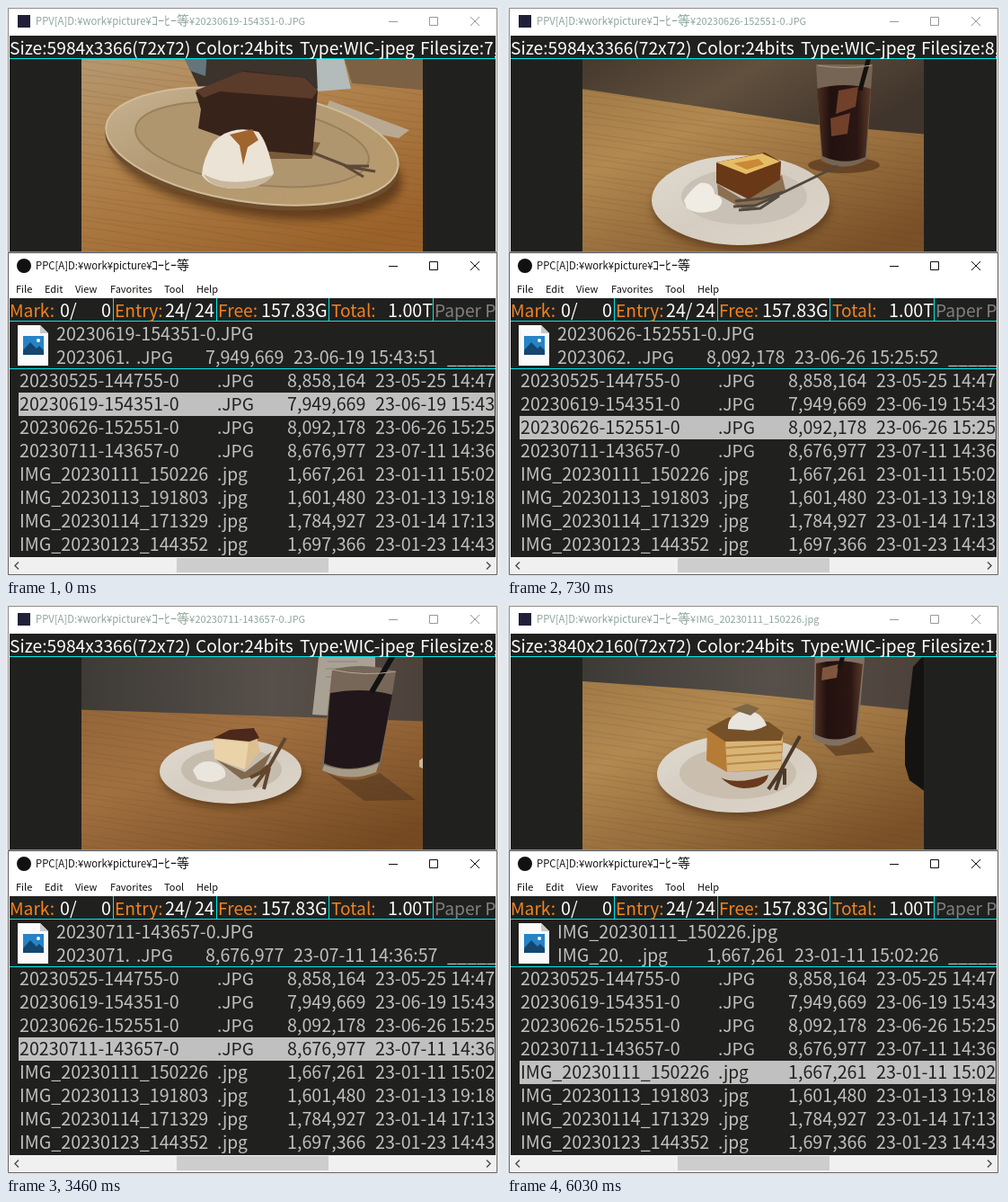
Recreate the animation shown at these times as an HTML page. Size 551 px wide and 634 px high, loop 8000 ms.

```html
<!DOCTYPE html>
<html lang="ja">
<head>
<meta charset="utf-8">
<title>Image viewer and file list</title>
<style>
html, body { margin: 0; width: 100%; height: 100%; overflow: hidden; background: #e9e9e9; }
svg { display: block; }
text { font: 19.7px "Noto Sans CJK JP", "Noto Sans", sans-serif; fill: #c0c0c0; white-space: pre; }
.small text { font-size: 11px; fill: #111; }
.small .path { font-size: 11.3px; }
.small .kana { font-size: 14px; }
.idle text { fill: #8fa69a; }
.white, .white text { fill: #fff; }
.label { fill: #f4821f; }
.word, .word text { font-size: 19.2px; }
.dim { fill: #808080; }
</style>
</head>
<body>
<svg width="551" height="634" viewBox="0 0 551 634">
  <defs>
    <clipPath id="view"><path d="M4 33H545V612H4Z"/></clipPath>
    <clipPath id="photoArea"><path d="M84 59H464V273H84Z"/></clipPath>
    <linearGradient id="wallA" x2="1" y2=".4"><stop stop-color="#41362b"/><stop offset=".5" stop-color="#61503e"/><stop offset="1" stop-color="#40352c"/></linearGradient>
    <linearGradient id="wallB" x2="1" y2="0"><stop stop-color="#3c3935"/><stop offset=".55" stop-color="#57504a"/><stop offset="1" stop-color="#4b4038"/></linearGradient>
    <linearGradient id="daylit" x2=".6" y2="1"><stop stop-color="#b59a74"/><stop offset=".45" stop-color="#b0824c"/><stop offset="1" stop-color="#9a6129"/></linearGradient>
    <linearGradient id="oak" x2=".7" y2="1"><stop stop-color="#9a7443"/><stop offset=".4" stop-color="#b28950"/><stop offset="1" stop-color="#795027"/></linearGradient>
    <linearGradient id="amber" x2=".7" y2="1"><stop stop-color="#8a6034"/><stop offset=".5" stop-color="#a17040"/><stop offset="1" stop-color="#754a22"/></linearGradient>
    <linearGradient id="stoneware" x2="1" y2=".6"><stop stop-color="#c9b594"/><stop offset=".5" stop-color="#b39a74"/><stop offset="1" stop-color="#b89a6c"/></linearGradient>
    <linearGradient id="porcelain" x2="1" y2="1"><stop stop-color="#e0dad0"/><stop offset=".5" stop-color="#d5cdc1"/><stop offset="1" stop-color="#ded6c9"/></linearGradient>
    <linearGradient id="drink" x2="1" y2="0"><stop stop-color="#4e2e20"/><stop offset=".25" stop-color="#21110f"/><stop offset=".75" stop-color="#2b1613"/><stop offset="1" stop-color="#5b3a29"/></linearGradient>
    <pattern id="grain" width="190" height="23" patternUnits="userSpaceOnUse" patternTransform="rotate(8)">
      <path d="M0 3Q50 6 95 3T190 3M0 11Q45 8 95 11T190 11M0 18Q70 20 95 18T190 18" fill="none" stroke="#4d2e12" stroke-opacity=".14"/>
    </pattern>
    <filter id="soft"><feGaussianBlur stdDeviation=".7"/></filter>
    <filter id="shade"><feGaussianBlur stdDeviation="5"/></filter>
  </defs>

  <path d="M2.5 2.5H546.5V273.5H2.5Z" fill="#fff" stroke="#8c8c8c"/>
  <path d="M4 33H545V273H4Z" fill="#20211f"/>

  <g clip-path="url(#photoArea)"><g id="photos" filter="url(#soft)">
    <g>
      <path d="M70 50H480V290H70Z" fill="url(#daylit)"/>
      <path d="M70 50H480V290H70Z" fill="url(#grain)"/>
      <path d="M195 50H350V92H215Z" fill="#3b332c"/>
      <path d="M195 50H224L222 78L205 72Z" fill="#66757c"/>
      <path d="M345 50H374L384 92L347 95Z" fill="#b3bbbb"/>
      <path d="M374 50H480V95L385 86Z" fill="#7d6144"/>
      <path d="M360 105L449 138L437 147L350 130Z" fill="#b9a992"/>
      <ellipse cx="280" cy="176" rx="162" ry="58" fill="#3d230f" opacity=".6" transform="rotate(8 280 176)" filter="url(#shade)"/>
      <ellipse cx="274" cy="162" rx="165" ry="62" fill="#6d4d2d" transform="rotate(8 274 162)"/>
      <ellipse cx="274" cy="156" rx="164" ry="62" fill="url(#stoneware)" stroke="#d1bd98" stroke-width="2" transform="rotate(8 274 156)"/>
      <ellipse cx="274" cy="154" rx="131" ry="44" fill="#b0966e" stroke="#98805c" stroke-width="2" transform="rotate(8 274 154)"/>
      <path d="M295 145L350 152L340 170L285 170Z" fill="#624326" opacity=".7"/>
      <path d="M211 96L265 72L334 80L347 94L341 166L284 161L214 136L217 115Z" fill="#38231a"/>
      <path d="M211 94L263 73L333 80L347 94L341 103L238 95L220 102Z" fill="#5b3b29"/>
      <path d="M341 163L382 179L411 184M380 178L404 178M376 177L398 190" fill="none" stroke="#5c4a38" stroke-width="3"/>
      <path d="M218 188Q219 170 231 151Q251 131 281 140Q291 151 298 186Q288 204 251 203Q226 201 218 188Z" fill="#ebe3d6"/>
      <path d="M220 187Q250 204 297 188Q286 204 251 203Q226 201 220 187Z" fill="#c9b89d"/>
      <path d="M249 143L274 137L281 149L269 157L264 177L260 155Z" fill="#a0642d"/>
    </g>
    <g>
      <path d="M70 50H480V290H70Z" fill="url(#oak)"/>
      <path d="M70 50H480V290H70Z" fill="url(#grain)"/>
      <path d="M70 50H480V144L345 132L70 90Z" fill="url(#wallA)"/>
      <ellipse cx="375" cy="177" rx="40" ry="9" fill="#4a2c16" opacity=".6"/>
      <path d="M344 65H407L400 171Q376 186 350 172Z" fill="#766554"/>
      <path d="M345 92Q376 84 405 92L399 168Q376 178 351 167Z" fill="url(#drink)"/>
      <path d="M369 94L391 90L388 112L366 120ZM360 125L382 119L379 142L361 145Z" fill="#71402a"/>
      <path d="M403 57L393 94" stroke="#15110f" stroke-width="5"/>
      <path d="M346 66Q376 71 406 66" fill="none" stroke="#a99a85"/>
      <ellipse cx="261" cy="224" rx="99" ry="47" fill="#4a2b12" opacity=".6" filter="url(#shade)"/>
      <ellipse cx="260" cy="216" rx="99" ry="50" fill="url(#porcelain)"/>
      <ellipse cx="264" cy="212" rx="70" ry="31" fill="#c9c1b5"/>
      <path d="M234 198L264 216L306 188L310 205L267 228L235 210Z" fill="#8b6f51"/>
      <path d="M233 174L287 163L305 173L304 193L269 215L233 197Z" fill="#683817"/>
      <path d="M233 174L284 164L304 173L266 187Z" fill="#e6bd67"/>
      <path d="M252 175L280 170L286 176L267 182Z" fill="#ca8937"/>
      <path d="M197 216Q206 202 215 197Q229 195 231 209Q246 215 234 226Q214 234 200 225Z" fill="#f0ece3"/>
      <path d="M368 178L300 211M307 207L284 214L254 217M301 211L276 222L252 223M303 211L282 225L258 227" fill="none" stroke="#51483f" stroke-width="3"/>
    </g>
    <g>
      <path d="M70 50H480V290H70Z" fill="url(#amber)"/>
      <path d="M70 50H480V290H70Z" fill="url(#grain)"/>
      <path d="M70 50H480V131L70 117Z" fill="url(#wallB)"/>
      <path d="M349 50H411V127L341 123Z" fill="#aaa195"/>
      <path d="M358 64H391M356 72H386M356 81H374" stroke="#8b8178"/>
      <path d="M352 184Q382 205 416 188L456 218L399 219Z" fill="#49301d" opacity=".5"/>
      <path d="M363 73Q399 64 434 75L417 180Q389 201 351 184Z" fill="#776758"/>
      <path d="M361 99Q397 92 430 101L416 175Q384 190 354 177Z" fill="#21171a"/>
      <path d="M354 179Q385 190 415 177L412 187Q382 199 352 185Z" fill="#a69b87"/>
      <path d="M431 57L407 98" stroke="#121213" stroke-width="6"/>
      <path d="M363 73Q399 81 434 75" fill="none" stroke="#b2a796"/>
      <path d="M460 174L466 170V184L460 181Z" fill="#c7b79e"/>
      <ellipse cx="252" cy="193" rx="79" ry="33" fill="#3f2511" opacity=".6" filter="url(#shade)"/>
      <ellipse cx="250" cy="186" rx="79" ry="36" fill="url(#porcelain)"/>
      <ellipse cx="251" cy="184" rx="56" ry="24" fill="#c6bcae"/>
      <path d="M234 173L266 187L296 164L283 190L262 195Z" fill="#80694f"/>
      <path d="M231 150L277 139L283 164L266 184L232 172Z" fill="#dcbf91"/>
      <path d="M231 149L249 140L276 138L282 149L271 153Z" fill="#4b281b"/>
      <path d="M231 150L270 154L266 184L232 172Z" fill="#ead2a9"/>
      <path d="M208 185Q216 172 232 176Q246 181 244 192Q231 202 213 195Z" fill="#eae6dd"/>
      <path d="M311 149L291 184M292 180L284 187L272 193M291 183L276 203M293 182L287 206" fill="none" stroke="#61462d" stroke-width="4"/>
    </g>
    <g>
      <path d="M70 50H480V290H70Z" fill="url(#oak)"/>
      <path d="M70 50H480V290H70Z" fill="url(#grain)"/>
      <path d="M70 50H480V121L230 96L70 85Z" fill="url(#wallB)"/>
      <path d="M342 145Q365 165 395 147L409 165L366 169Z" fill="#472b17" opacity=".55"/>
      <path d="M343 50H399L390 148Q366 167 340 149Z" fill="#817061"/>
      <path d="M344 66Q370 60 396 67L388 145Q365 156 343 145Z" fill="url(#drink)"/>
      <path d="M351 71L369 67L367 82L350 85Z" fill="#7f553d"/>
      <path d="M376 50L370 72" stroke="#171313" stroke-width="5"/>
      <path d="M470 50L452 70L443 150V179L448 196L470 212Z" fill="#141312"/>
      <ellipse cx="258" cy="197" rx="88" ry="40" fill="#442812" opacity=".6" filter="url(#shade)"/>
      <ellipse cx="256" cy="189" rx="89" ry="43" fill="url(#porcelain)"/>
      <ellipse cx="257" cy="188" rx="65" ry="29" fill="#cabfaf"/>
      <path d="M223 140L247 126L290 131L308 143L305 184L245 187L222 174Z" fill="#b57c38"/>
      <path d="M243 150L307 146L305 183L245 187Z" fill="#d8b577"/>
      <path d="M244 160L306 156M244 169L306 165M245 178L305 174" stroke="#b88746" stroke-width="2"/>
      <path d="M222 139L247 126L291 131L308 143L305 152L243 153Z" fill="#765027"/>
      <path d="M246 139Q245 125 262 119Q282 117 289 135Q274 143 263 140Z" fill="#e8e4de"/>
      <path d="M250 117L267 111L281 116L271 124Z" fill="#7b6848"/>
      <path d="M238 193Q256 202 291 190Q288 205 263 205Q249 204 238 193Z" fill="#693a1d"/>
      <path d="M326 147L306 183M308 180L302 190L291 206M307 182L299 207M309 183L309 201" fill="none" stroke="#4d3928" stroke-width="4"/>
    </g>
  </g></g>

  <path d="M2.5 274.5H546.5V632.5H2.5Z" fill="#fff" stroke="#606060"/>
  <path d="M4 325H545V613H4Z" fill="#20211f"/>
  <path d="M4 613H545V631H4Z" fill="#f0f0f0"/>
  <path d="M190 614H359V630H190Z" fill="#cdcdcd"/>
  <path d="M14 618.5L10 622.5L14 626.5M535 618.5L539 622.5L535 626.5" fill="none" stroke="#505050" stroke-width="1.5"/>

  <path d="M13 10H27V24H13Z" fill="#20203a"/>
  <circle cx="20" cy="289" r="8" fill="#111"/>
  <g fill="none">
    <path id="controls" d="M426 17.5H436M471.5 12.5H480.5V21.5H471.5ZM517 12L527 22M527 12L517 22"/>
    <use href="#controls" stroke="#999"/>
    <use href="#controls" y="272" stroke="#111"/>
  </g>
  <g class="small idle">
    <text class="path" x="33" y="21">PPV[A]D:¥work¥picture¥</text><text class="kana" x="162" y="21">ｺｰﾋｰ等</text><text x="204" y="21">¥</text>
    <text id="title" x="210.5" y="21"></text>
  </g>
  <g class="small">
    <text class="path" x="33" y="293">PPC[A]D:¥work¥picture¥</text><text class="kana" x="162" y="293">ｺｰﾋｰ等</text>
    <text x="11" y="319">File</text><text x="43" y="319">Edit</text><text x="77" y="319">View</text>
    <text x="116" y="319">Favorites</text><text x="176" y="319">Tool</text><text x="212" y="319">Help</text>
  </g>

  <g clip-path="url(#view)">
    <path d="M4 58.5H545M4 350.5H545M4 403.5H545M119.5 325V350M234.5 325V350M359.5 325V350M475.5 325V350" stroke="#00e8e8"/>
    <text id="loading" class="white word" x="4" y="54">Loading file</text>
    <g id="details" class="white word">
      <text id="dimensions" x="4" y="54"></text><text x="211" y="54">Color:24bits</text>
      <text x="327" y="54">Type:WIC-jpeg</text><text id="filesize" x="461" y="54"></text>
    </g>
    <text class="label word" x="4" y="346">Mark:</text><text class="white" x="60" y="346">0/</text><text class="white" x="106" y="346">0</text>
    <text class="label word" x="121" y="346">Entry:</text><text class="white" x="177" y="346">24/</text><text class="white" x="210" y="346">24</text>
    <text class="label word" x="236" y="346">Free:</text><text class="white" x="284" y="346">157.83G</text>
    <text class="label word" x="362" y="346">Total:</text><text class="white" x="425" y="346">1.00T</text>
    <text class="dim word" x="477" y="346">Paper P</text>

    <path d="M13 355H38L47 364V400H13Z" fill="#fafafa"/><path d="M38 355V364H47Z" fill="#c8c8c8"/>
    <path d="M19 367H42V388H19Z" fill="#2584c6"/><path d="M19 383L27 374L34 381L37 378L42 383V388H19Z" fill="#15466f"/>
    <circle cx="36" cy="372" r="2" fill="#fff"/>
    <g id="info"></g>
    <path id="cursor" d="M14 0H544V26H14Z" fill="#c0c0c0"/>
    <g id="list"></g>
  </g>
</svg>
<script>
const files = `20230525-144755-0 .JPG 8,858,164 23-05-25 14:47:56
20230619-154351-0 .JPG 7,949,669 23-06-19 15:43:51
20230626-152551-0 .JPG 8,092,178 23-06-26 15:25:52
20230711-143657-0 .JPG 8,676,977 23-07-11 14:36:57
IMG_20230111_150226 .jpg 1,667,261 23-01-11 15:02:26
IMG_20230113_191803 .jpg 1,601,480 23-01-13 19:18:04
IMG_20230114_171329 .jpg 1,784,927 23-01-14 17:13:30
IMG_20230123_144352 .jpg 1,697,366 23-01-23 14:43:53`.split('\n').map(line => line.split(' '));

// Start time, selected row, row named in the title, row shown as photo.
const states = [
  [0, 1, 1, 1], [500, 2, 2, 1], [730, 2, 2, 2],
  [3220, 3, 2, 2], [3310, 3, 3, 2], [3460, 3, 3, 3],
  [5950, 4, 4, 3], [6030, 4, 4, 4]
];
const loopLength = 8000;
const $ = id => document.getElementById(id);
const label = (x, y, value, kind = '') => `<text class="${kind}" x="${x}" y="${y}">${value}</text>`;
const show = (node, visible) => { node.style.display = visible ? '' : 'none'; };

$('list').innerHTML = files.map(([name, type, size, date, time], row) => {
  const y = 424 + row * 26;
  return `<g>${label(15, y, name)}${label(235, y, type, 'word')}${label(313, y, size)}${label(411, y, date)}${label(495, y, time.slice(0, 5))}</g>`;
}).join('');

let current;
function render(state) {
  const [, selected, titled, shown] = state;
  const [name, type, size, date, time] = files[selected];
  const loading = selected !== shown;
  $('title').textContent = files[titled].slice(0, 2).join('');
  $('dimensions').textContent = `Size:${shown === 4 ? '3840x2160' : '5984x3366'}(72x72)`;
  $('filesize').textContent = `Filesize:${files[shown][2]}`;
  show($('loading'), loading);
  show($('details'), !loading);
  [...$('photos').children].forEach((photo, i) => show(photo, i === shown - 1));
  $('info').innerHTML = label(56, 372, name + type) +
    label(56, 398, name.slice(0, name.startsWith('IMG') ? 6 : 7) + '.') + label(145, 398, type, 'word') +
    label(222, 398, size) + label(320, 398, date) + label(404, 398, time) + label(491, 398, '______');
  $('cursor').setAttribute('transform', `translate(0 ${404 + selected * 26})`);
  [...$('list').children].forEach((row, i) => {
    for (const cell of row.children) cell.style.fill = i === selected ? '#20211f' : '';
  });
}

function tick() {
  const time = performance.now() % loopLength;
  const state = states.findLast(([start]) => start <= time);
  if (state !== current) render(current = state);
  requestAnimationFrame(tick);
}
tick();
</script>
</body>
</html>
```
